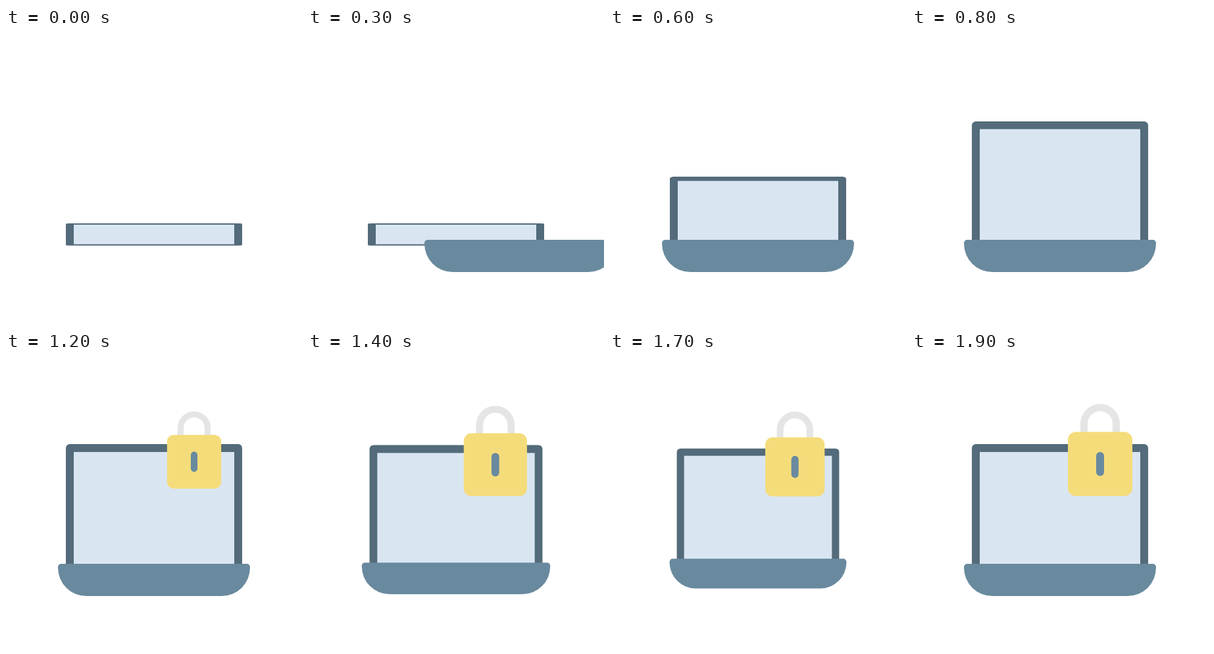
An HTML page with a canvas that plays this animation: 450x450 px, repeating every 2 s.

```html
<!DOCTYPE html>
<html lang="en">
<head>
<meta charset="utf-8">
<title>Laptop and lock</title>
<style>
  html, body { margin: 0; width: 100%; height: 100%; overflow: hidden; background: #fff; }
  canvas { display: block; }
</style>
</head>
<body>
<canvas id="stage" width="450" height="450"></canvas>
<script>
const ctx = document.getElementById('stage').getContext('2d');
const LOOP = 2000, STEP = 100;
const color = {
  frame: '#536b7a', glass: '#d9e6f1', base: '#698a9e',
  body: '#f5dc7b', shackle: '#e5e5e5'
};

// Poses on the animation's 100 ms beat; the last value holds.
const track = (start, values) => step =>
  values[Math.max(0, Math.min(values.length - 1, step - start))];
const baseShift = track(1, [380, 262, 98, 9, 0]);
const screenTop = track(4, [297, 275, 226, 167, 142, 140]);
const lockScale = track(9, [0, 0.12, 0.46, 0.84, 0.99, 1]);
const pulse = track(13, [1, 0.981, 0.925, 0.9, 0.921, 0.973, 1]);

function box(x, y, w, h, radius, fill) {
  ctx.fillStyle = fill;
  ctx.beginPath();
  ctx.roundRect(x, y, w, h, radius);
  ctx.fill();
}

function scaled(x, y, sx, sy, draw) {
  ctx.save();
  ctx.translate(x, y);
  ctx.scale(sx, sy);
  ctx.translate(-x, -y);
  draw();
  ctx.restore();
}

function drawScreen() {
  box(91, 140, 268, 195, 6, color.frame);
  box(103, 152, 244, 171, 0, color.glass);
}

function drawLock() {
  ctx.strokeStyle = color.shackle;
  ctx.lineWidth = 11;
  ctx.beginPath();
  ctx.moveTo(261.5, 126);
  ctx.lineTo(261.5, 109);
  ctx.arc(286, 109, 24.5, Math.PI, 0);
  ctx.lineTo(310.5, 126);
  ctx.stroke();
  box(237, 121.5, 98, 97.5, 12, color.body);
  box(280, 152, 12, 36.5, 6, color.base);
}

function render(step) {
  ctx.clearRect(0, 0, 450, 450);
  const zoom = pulse(step);
  scaled(225, 225, zoom, zoom, () => {
    const hinge = 330;
    scaled(225, hinge, 1, (hinge - screenTop(step)) / 190, drawScreen);
    box(79 + baseShift(step), 322, 292, 49, [5, 5, 43, 43], color.base);
    const size = lockScale(step);
    if (size > 0) scaled(286, 149, size, size, drawLock);
  });
}

function tick() {
  render(Math.floor((performance.now() % LOOP) / STEP));
  requestAnimationFrame(tick);
}
tick();
</script>
</body>
</html>
```
